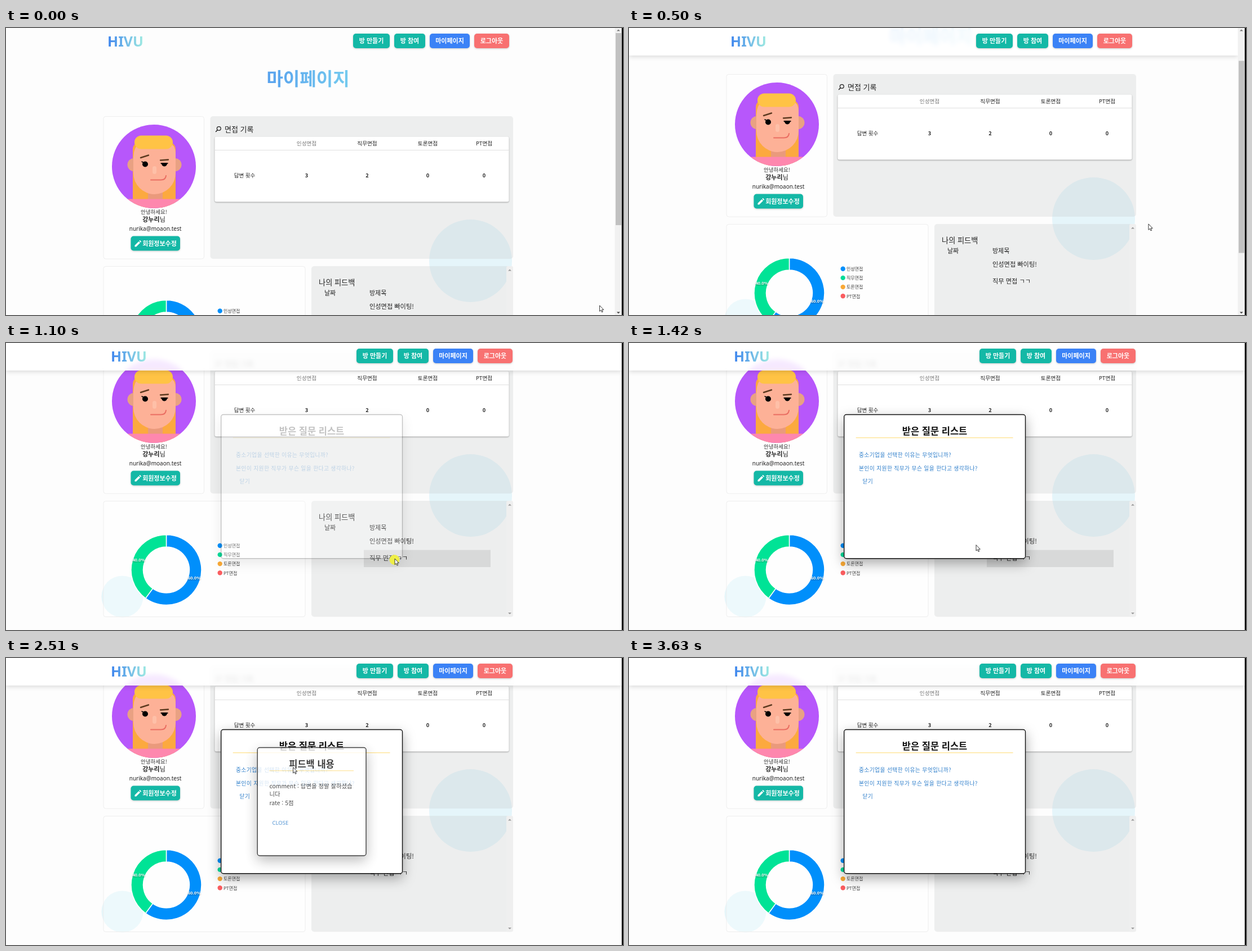
These frames come from a looping animation (1095 px wide and 511 px high, 4230 ms). An HTML page:

```html
<!DOCTYPE html>
<html lang="ko">
<head>
<meta charset="utf-8">
<title>마이페이지</title>
<style>
  html, body { margin: 0; width: 100%; height: 100%; overflow: hidden; background: #fdfdfd; }
  svg { position: absolute; left: 0; top: 0; }
  text { font-family: 'Noto Sans CJK KR', 'Noto Sans CJK', 'Noto Sans CJK JP', 'Noto Sans', sans-serif; white-space: pre; }
  .latin { font-family: 'Noto Sans', sans-serif; }
  .arial { font-family: 'Liberation Sans', sans-serif; }
  .link { letter-spacing: .35px; }
  .raised { filter: drop-shadow(0 1.5px 1.5px rgba(0,0,0,.2)); }
  .paper { filter: drop-shadow(0 1px 1px rgba(0,0,0,.35)); }
  .label { filter: drop-shadow(0 1px 1px rgba(0,0,0,.45)); }
  .dialog { filter: drop-shadow(0 8px 11px rgba(0,0,0,.33)); }
  #bar {
    position: absolute; left: 0; top: 0; height: 48.5px;
    background: rgba(255,255,255,.87); backdrop-filter: blur(4px);
    box-shadow: 0 2px 8px rgba(0,0,0,.15);
  }
</style>
</head>
<body>
<svg id="page" width="1095" height="511"></svg>
<div id="bar"></div>
<svg id="top" width="1095" height="511"></svg>
<script>
const LOOP = 4230;
const TEAL = '#14b8a6', LINK = '#2f7fcb';
const $ = id => document.getElementById(id);

// Text is placed by its vertical middle.
const text = (x, middle, size, content, { fill = '#222', weight = 400, anchor = 'start', cls = '' } = {}) =>
  `<text x="${x}" y="${middle + size * .38}" font-size="${size}" fill="${fill}" font-weight="${weight}" text-anchor="${anchor}" class="${cls}">${content}</text>`;
const centered = (x, middle, size, content, options) =>
  text(x, middle, size, content, { anchor: 'middle', ...options });
const rect = (x, y, x2, y2, r, fill, extra = '') =>
  `<rect x="${x}" y="${y}" width="${x2 - x}" height="${y2 - y}" rx="${r}" fill="${fill}" ${extra}/>`;
const circle = (x, y, r, fill, extra = '') => `<circle cx="${x}" cy="${y}" r="${r}" fill="${fill}" ${extra}/>`;
const path = (d, fill, extra = '') => `<path d="${d}" fill="${fill}" ${extra}/>`;
const line = (d, color, width) => path(d, 'none', `stroke="${color}" stroke-width="${width}" stroke-linecap="round"`);
const gradient = (id, x1, x2, from, to) =>
  `<linearGradient id="${id}" gradientUnits="userSpaceOnUse" x1="${x1}" x2="${x2}" y1="0" y2="0">
    <stop stop-color="${from}"/><stop offset="1" stop-color="${to}"/></linearGradient>`;
const button = (x, x2, y, fill, label, middle = (x + x2) / 2) =>
  rect(x, y, x2, y + 26, 5, fill, 'class="raised"') +
  centered(middle, y + 13, 11, label, { fill: '#fff', weight: 700 });
const arrow = (x, y, dir, color) => path(`M${x - 3} ${y + 1.5 * dir}h6l-3 ${-3 * dir}z`, color);

const avatar = `
  <clipPath id="round">${circle(262.5, 246.5, 74.5, '#000')}</clipPath>
  <g clip-path="url(#round)">
    ${rect(188, 172, 337, 321, 0, '#b757fb')}
    ${rect(225, 203, 301, 320, 13, '#fca93f')}
    ${circle(227, 243.5, 11.5, '#e9a183')}${circle(300, 243.5, 11.5, '#e9a183')}
    ${rect(252, 285, 278, 306, 0, '#ea9a7c')}
    ${path('M226 230Q228 206 240 206H288Q301 206 301 225V258A37.5 38 0 0 1 226 258Z', '#fdb197')}
    ${rect(228, 191.5, 296, 215.5, 12, '#ffc345')}
    ${rect(188, 304.5, 337, 322, 0, '#fe87ae')}
    ${rect(260, 246, 267, 260, 3.5, '#fec0a8')}
    ${line('M239 231L253 226.5M274 235.5L288 234.5', '#5d3a20', 2.4)}
    ${circle(247, 242.5, 5, '#000')}
    ${path('M275.5 240H286.5A5.5 6.5 0 0 1 275.5 240Z', '#000')}
    ${line('M241 238l4 2M275 241H287', '#000', 1.5)}
    ${line('M257 270.5H275Q283 270.5 284 263', '#ea6e62', 2)}
  </g>`;

const profile = rect(173, 157.5, 351.5, 411, 4, '#fff', 'fill-opacity=".3" stroke="#eee"') + avatar +
  centered(262.5, 327.5, 9.5, '안녕하세요!', { fill: '#333' }) +
  centered(262.5, 341, 11, '<tspan font-weight="700">강누리</tspan>님') +
  centered(265, 357, 10, 'nurika@moaon.test', { cls: 'latin', weight: 500 }) +
  button(221.5, 309, 370.5, TEAL, '회원정보수정', 272.5) +
  path('M228.5 389.5v-2.6l7-7 2.6 2.6-7 7zM236.3 379.1l1.4-1.3 2.6 2.6-1.4 1.3z', '#fff');

const columns = [[533.5, '인성면접', 3], [641, '직무면접', 2], [748.5, '토론면접', 0], [848.5, 'PT면접', 0]];
const records = rect(362.5, 157, 900, 411, 5, 'rgba(200,203,201,.3)') +
  circle(377.8, 179, 3.4, 'none', 'stroke="#222" stroke-width="1.3"') +
  line('M375.2 181.7L372.5 184.5', '#222', 1.5) +
  text(388, 180, 13, '면접 기록', { weight: 500 }) +
  rect(370.5, 193.5, 892.5, 309.5, 3, '#fff', 'class="paper"') +
  rect(370.5, 217, 892.5, 218, 0, '#dfdfdf') +
  centered(423.5, 262.5, 9.5, '답변 횟수') +
  columns.map(([x, name, count], i) =>
    centered(x, 205, 9.6, name, { fill: i ? '#222' : '#777' }) +
    centered(x, 262.5, 9.2, count, { weight: 700 })).join('');

const share = 2 * Math.PI * .6;
const onRing = (angle, r) => `${284.5 + r * Math.sin(angle)} ${547 - r * Math.cos(angle)}`;
const slice = (from, to, large, fill) => path(
  `M${onRing(from, 62.5)}A62.5 62.5 0 ${large} 1 ${onRing(to, 62.5)}L${onRing(to, 41)}A41 41 0 ${large} 0 ${onRing(from, 41)}Z`,
  fill, 'stroke="#fff" stroke-width="1.5"');
const percent = (x, y, value) =>
  centered(x, y, 8, value, { fill: '#fff', weight: 700, cls: 'arial label' });
const chart = rect(173, 424.5, 531, 630.5, 4, '#fff', 'fill-opacity=".3" stroke="#eee"') +
  slice(0, share, 1, '#008ffb') + slice(share, 2 * Math.PI, 0, '#00e396') +
  percent(334, 560.5, '60.0%') + percent(235.5, 529, '40.0%') +
  ['#008ffb', '#00dc98', '#f9a936', '#fa5d60'].map((color, i) =>
    circle(379.7, 503.7 + i * 16.2, 4.2, color) +
    text(386, 503.9 + i * 16.2, 8, columns[i][1], { fill: '#444' })).join('');

const feedback = rect(542, 424, 900, 630.5, 5, 'rgba(200,203,201,.3)') +
  rect(635, 511.5, 860, 542, 0, 'rgba(0,0,0,.09)', 'id="row"') +
  text(555, 452.5, 13.2, '나의 피드백', { weight: 500 }) +
  text(565, 472, 11, '날짜') + text(645, 472, 11, '방제목') +
  text(645, 495.3, 11.2, '인성면접 빠이팅!') + text(645, 526, 11.2, '직무 면접 ㄱㄱ') +
  rect(888, 424, 900, 630.5, 3, '#efefef') +
  arrow(894, 431, 1, '#999') + arrow(894, 624.5, -1, '#999');

$('page').innerHTML = gradient('sky', 462, 610, '#58a2ee', '#75cbef') + `<g id="scroll">
  ${circle(824.5, 414.5, 73.5, '#e5f5fa')}${circle(206.5, 594.5, 37, '#e5f6fa')}
  ${centered(536, 90, 32, '마이페이지', { fill: 'url(#sky)', weight: 700 })}
  ${profile}${records}${chart}${feedback}</g>`;

const dialog = (id, x, y, x2, y2, title, content) => `<g id="${id}">
  ${rect(x, y, x2, y2, 4, '#fff', 'stroke="#111" stroke-width="1.4" class="dialog"')}
  ${centered(542.5, y + 29.5, 16.5, title, { weight: 700, fill: '#111' })}
  ${rect(x + 21, y + 40.5, x2 - 22, y + 41.8, 0, '#ffe28f')}${content}</g>`;
const link = (x, y, label) => text(x, y, 9.8, label, { fill: LINK, cls: 'link' });

$('top').innerHTML = gradient('brand', 181, 241, '#3f86ee', '#9be6e2') + `
  <g id="head">
    ${text(180, 23.5, 25, 'HIVU', { fill: 'url(#brand)', weight: 600, cls: 'latin' })}
    ${button(616, 681, 10, TEAL, '방 만들기')}${button(689, 744, 10, TEAL, '방 참여')}
    ${button(752, 823, 10, '#3b82f6', '마이페이지')}${button(831, 893, 10, '#f87171', '로그아웃')}
  </g>
  <g id="scrollbar">
    ${rect(1080.5, 0, 1093, 511, 0, '#f1f1f1')}
    ${rect(1082, 9, 1092, 351, 0, '#c1c1c1', 'id="thumb"')}
    ${arrow(1086.8, 4, 1, '#777')}${arrow(1086.8, 507, -1, '#444')}
  </g>
  ${rect(1092.8, 0, 1095, 511, 0, '#000')}
  ${dialog('questions', 381.7, 127.5, 703.5, 383.8, '받은 질문 리스트',
    rect(403, 188, 575, 211, 3, '#f3f8fd', 'id="hover"') +
    link(408, 199.3, '중소기업을 선택한 이유는 무엇입니까?') +
    link(408, 223, '본인이 지원한 직무가 무슨 일을 한다고 생각하나?') +
    link(414.5, 246.5, '닫기'))}
  ${dialog('answer', 446.2, 159.5, 639, 352, '피드백 내용',
    text(467.5, 228, 10.4, 'comment : 답변을 정말 잘하셨습') +
    text(467.5, 242.5, 10.4, '니다') + text(467.5, 258.5, 10.4, 'rate : 5점') +
    text(472.5, 293.3, 9.5, 'CLOSE', { fill: LINK, cls: 'latin' }))}
  <g id="cursor">
    ${circle(-.5, 2, 9, '#eeee46', 'id="click"')}
    <g fill="#fff" stroke="#222" stroke-width=".9" stroke-linejoin="round">
      <path id="pointer" d="M0 0V10.5L2.4 8.3 4 12 5.7 11.3 4.1 7.7H7.3Z"/>
      <path id="hand" d="M-1 1a1.1 1.1 0 0 1 2.2 0V5l4 .8q1.3 .4 1.2 1.8l-.6 3.4-.8 2.3h-5.2l-3.6-4.7q-.6-1.3 .8-1.4l2 1.4Z"/>
    </g>
  </g>`;

const ticks = [0, 100, 200, 300, 390, 500, 600, 700, 800, 900, 1100, 1200, 1300, 1420, 1510, 1610,
  1710, 1810, 1910, 2010, 2110, 2310, 2410, 2510, 2610, 2710, 2810, 2910, 3010, 3120, 3220, 3330, 3430, 3530, 3630];
const scrollTrack = [[300, 0], [390, 4.5], [500, 75], [600, 138], [700, 143]];
const questionsTrack = [[1000, 0], [1100, .25], [1200, .8], [1300, 1]];
const answerTrack = [[2310, 0], [2410, .25], [2510, .8], [2610, 1], [3010, 1], [3120, .85], [3220, .25], [3330, 0]];
const cursorTrack = [[0, 1053.5, 494], [100, 1035, 470], [200, 990, 410], [300, 945, 360], [390, 928.5, 345.5],
  [600, 916, 352], [700, 880, 360], [800, 760, 375], [900, 690, 384], [1200, 690, 384], [1420, 616, 359.5],
  [1610, 556, 280], [1810, 513, 205], [1910, 509.5, 194.5], [2610, 509.5, 194.5], [2910, 492, 285],
  [3010, 490.5, 291.5], [3220, 490.5, 291.5], [3430, 416, 244], [3530, 872, 392]];

function sample(track, t) {
  const next = track.findIndex(key => key[0] > t);
  if (next === 0) return track[0].slice(1);
  if (next < 0) return track.at(-1).slice(1);
  const a = track[next - 1], b = track[next], k = (t - a[0]) / (b[0] - a[0]);
  return a.slice(1).map((v, i) => v + (b[i + 1] - v) * k);
}
const show = (id, opacity) => { $(id).style.opacity = Number(opacity); };
const move = (id, x, y) => $(id).setAttribute('transform', `translate(${x} ${y})`);

function draw(now) {
  const elapsed = now % LOOP;
  const t = ticks.findLast(tick => tick <= elapsed);
  const [scroll] = sample(scrollTrack, t);
  const locked = t >= 1100;
  const between = (from, to) => t >= from && t < to;

  move('scroll', 0, -scroll);
  move('thumb', 0, scroll * .66);
  move('head', locked ? 6 : 0, 0);
  move('cursor', ...sample(cursorTrack, t));
  $('bar').style.width = (locked ? 1092.8 : 1080.5) + 'px';
  $('bar').style.display = scroll > 20 ? 'block' : 'none';
  show('scrollbar', !locked);
  show('questions', sample(questionsTrack, t)[0]);
  show('answer', sample(answerTrack, t)[0]);
  show('row', between(800, 1510));
  show('hover', between(1810, 2510));

  const overLink = between(1810, 2510) || between(2910, 3330);
  show('hand', overLink);
  show('pointer', !overLink);
  show('click', between(1100, 1200) || between(2310, 2410) || between(3120, 3220));
  show('cursor', t < 3630);
  requestAnimationFrame(draw);
}
requestAnimationFrame(draw);
</script>
</body>
</html>
```
